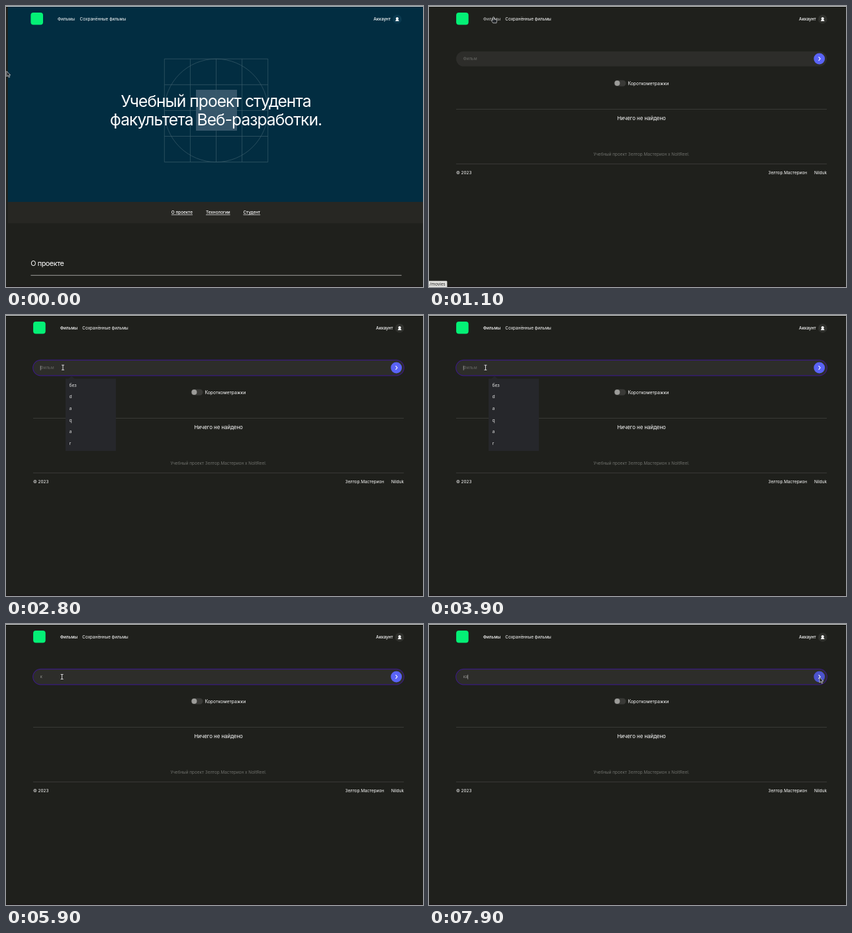
An HTML page for the animation above (8000 ms loop, 630 px wide and 426 px high).

```html
<!DOCTYPE html>
<html lang="ru">
<head>
<meta charset="utf-8">
<title>Поиск фильмов</title>
<style>
  html, body { margin: 0; width: 100%; height: 100%; overflow: hidden; background: #1f201c; }
  svg { display: block; width: 630px; height: 426px; }
  text { font-family: Inter, sans-serif; font-size: 6.39px; fill: #fff; }
  .medium { font-weight: 500; }
  .links text { text-decoration: underline; }
  .title { font-size: 24.57px; letter-spacing: -.038em; text-anchor: middle; }
  .heading { font-size: 10.81px; letter-spacing: -.04em; }
  .middle { text-anchor: middle; }
  .end { text-anchor: end; }
  .grey { fill: #6f706c; }
  .noto, #options text { font-family: "Noto Sans", sans-serif; }
  #options text { font-size: 6.8px; fill: #e2e2e2; }
  .cursor { fill: #22262a; stroke: #e4e4e4; stroke-width: .7; stroke-linejoin: round; }
</style>
</head>
<body>
<svg viewBox="0 0 630 426">
  <rect width="630" height="426" fill="#1f201c"/>

  <g id="landing">
    <rect x="2.8" y="1" width="628" height="296" fill="#022d41"/>
    <rect x="2.8" y="297" width="628" height="32.5" fill="#272723"/>
    <rect x="287" y="127" width="62" height="62" fill="#36566a"/>
    <g fill="none" stroke="#3a5c6b" stroke-width=".7">
      <path d="M239.3 80.2h156.4v156.4H239.3zM278.4 80.2v156.4M317.5 80.2v156.4M356.6 80.2v156.4M239.3 119.3h156.4M239.3 158.4h156.4M239.3 197.5h156.4"/>
      <circle cx="317.5" cy="158.4" r="78.2"/>
    </g>
    <text class="title" x="317.1" y="152.6">Учебный проект студента</text>
    <text class="title" x="317.1" y="181.4">факультета Веб-разработки.</text>
    <g class="links medium">
      <text x="249.8" y="315.4">О проекте</text>
      <text x="302" y="315.4">Технологии</text>
      <text x="358.4" y="315.4">Студент</text>
    </g>
    <text class="heading" x="37.3" y="394.3">О проекте</text>
    <path d="M37.4 408.3h560.2" stroke="#d6d6d4" stroke-width=".7"/>
  </g>

  <g id="movies">
    <rect x="41" y="68.7" width="560" height="22.8" rx="11.4" fill="#2d2d2a"/>
    <rect id="ring" x="40.7" y="68.4" width="560.6" height="23.4" rx="11.7" fill="none" stroke="#3a1c7e" stroke-width="1.2"/>
    <text id="query" x="51.4" y="82.4"></text>
    <rect id="caret" y="76.8" width=".7" height="7" fill="#b5b5b5"/>
    <circle id="button" cx="589.7" cy="80" r="8.4"/>
    <path d="M588.6 77.2l2.5 2.8-2.5 2.8" fill="none" stroke="#fff" stroke-width="1.1"/>
    <rect x="279.5" y="112.4" width="18" height="9.4" rx="4.7" fill="#393936"/>
    <circle cx="284.4" cy="117.1" r="4" fill="#9c9c99"/>
    <text x="300.4" y="119.5" style="font-size:6.88px">Короткометражки</text>
    <path d="M41 156.5h560M41 239.4h560" stroke="#454642" stroke-width=".7"/>
    <text class="middle" x="321" y="172.6" style="font-size:7.86px">Ничего не найдено</text>
    <text class="middle grey" x="321" y="227.3">Учебный проект Зелтор.Мастерион х NoltReel.</text>
    <text x="41" y="255.3">© 2023</text>
    <text class="end" x="571" y="255.3">Зелтор.Мастерион</text>
    <text class="end" x="601" y="255.3">Nilduk</text>
    <g id="options"><path d="M90 96.5h4.5l4.5-4 4.5 4h62.5V206H90z" fill="#26272b"/></g>
  </g>

  <g id="header">
    <rect x="37.4" y="10" width="18.6" height="18.6" rx="4" fill="#04f076"/>
    <text id="filmsLink" x="78" y="22.2">Фильмы</text>
    <text x="111.6" y="22.2">Сохранённые фильмы</text>
    <text class="medium" x="555.3" y="22.2">Аккаунт</text>
    <circle id="avatar" cx="591" cy="20" r="6.8"/>
    <path d="M591 17c1.4 0 2.1 1 2 2.2 0 .8-.4 1.3-.8 1.8l1.4.9v1h-5.2v-1l1.4-.9c-.4-.5-.8-1-.8-1.8-.1-1.2.6-2.2 2-2.2z" fill="#fff"/>
  </g>

  <rect width="630" height="1" fill="#d9dcdc"/>
  <rect y="424.3" width="630" height="1.7" fill="#1d191b"/>
  <g id="status">
    <path d="M0 416.8h26.2q1.2 0 1.2 1.2v8H0z" fill="#e0e0dd"/>
    <text class="noto" x="1" y="424" style="fill:#2c2c2c">/movies</text>
  </g>

  <g id="cursor">
    <path id="arrow" class="cursor" d="M0 0v8.2l1.9-1.7 1.4 3 1.4-.7-1.4-2.8h2.5z"/>
    <path id="hand" class="cursor" d="M-.9 5V.7Q0-.5.9.7v3l3.4.9q1 .3.8 1.4l-.7 3.5H-.7l-2.5-3.3q-.2-1 .8-1z"/>
    <g id="beam" fill="none">
      <path d="M-2-3.6h4M0-3.6v7.2M-2 3.6h4" stroke="#161616" stroke-width="1.9"/>
      <path d="M-2-3.6h4M0-3.6v7.2M-2 3.6h4" stroke="#e8e8e8" stroke-width="1"/>
    </g>
  </g>
</svg>
<script>
const LOOP = 8000, STEP = 100;
const $ = id => document.getElementById(id);
const show = (id, on) => $(id).setAttribute('display', on ? 'inline' : 'none');
const within = (v, from, to) => v >= from && v < to;

// Pointer stops: time, x, y
const path = [
  [0, 1, 98.8], [200, 22, 84], [500, 80, 32], [700, 97.5, 16.3], [1800, 97.5, 16.3],
  [2100, 93, 46], [2400, 86, 79.6], [3600, 86, 79.6], [3700, 85.5, 79.6], [4800, 85, 80],
  [5000, 84.6, 80], [6800, 84.6, 80], [6900, 165.5, 84], [7200, 420, 85], [7500, 612, 82],
  [7600, 622, 82], [7700, 606, 82], [7800, 593, 81], [7900, 590, 80.6], [LOOP, 590, 80.6]
];
const caretOn = [[2800, 3300], [3900, 4700], [5300, 5900], [6500, 7000], [7600, LOOP]];

['без', 'd', 'a', 'q', 'a', 'r'].forEach((word, i) => {
  const option = document.createElementNS('http://www.w3.org/2000/svg', 'text');
  option.setAttribute('x', 95.4);
  option.setAttribute('y', 108.5 + i * 17.7);
  option.textContent = word;
  $('options').append(option);
});

function pointerAt(t) {
  const i = path.findIndex(stop => stop[0] > t);
  const [t0, x0, y0] = path[i - 1], [t1, x1, y1] = path[i];
  const k = (t - t0) / (t1 - t0);
  return [x0 + (x1 - x0) * k, y0 + (y1 - y0) * k];
}

function draw(t) {
  const onMovies = t >= 1100, shift = onMovies ? 3.7 : 0;
  const [x, y] = pointerAt(t);
  const onLink = within(x, 78 + shift, 104 + shift) && within(y, 14, 25);
  const onButton = onMovies && Math.hypot(x - 589.7, y - 80) < 8.4;
  const onInput = onMovies && !onButton && within(x, 41, 601) && within(y, 68, 92);

  show('landing', !onMovies);
  show('movies', onMovies);
  $('header').setAttribute('transform', `translate(${shift})`);
  $('filmsLink').style.fontWeight = onMovies ? 500 : 400;
  $('filmsLink').style.opacity = onLink ? .65 : 1;
  $('avatar').setAttribute('fill', onMovies ? '#30312d' : '#0b3a50');
  $('button').setAttribute('fill', onButton ? '#4c53cd' : '#5a63f6');
  show('status', within(t, 600, 2200));

  const typed = t < 4200 ? '' : t < 6500 ? 'к' : 'ка';
  $('query').textContent = typed || 'Фильм';
  $('query').style.fill = typed ? '#8a8a87' : '#656662';
  $('caret').setAttribute('x', [51.8, 54.5, 58.4][typed.length]);
  show('caret', caretOn.some(([from, to]) => within(t, from, to)));
  show('ring', t >= 2800);
  show('options', within(t, 2800, 4200));

  $('cursor').setAttribute('transform', `translate(${x} ${y})`);
  show('hand', onLink);
  show('beam', onInput);
  show('arrow', !onLink && !onInput);
}

function tick() {
  draw(Math.floor(performance.now() % LOOP / STEP) * STEP);
  requestAnimationFrame(tick);
}
tick();
</script>
</body>
</html>
```
